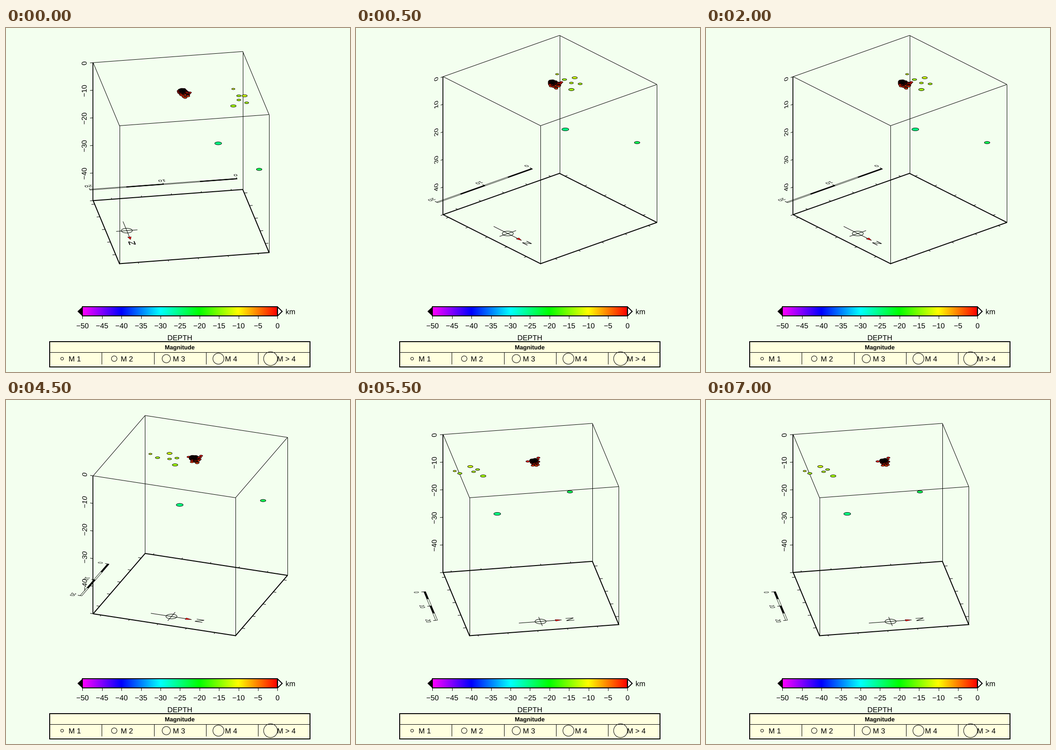
Recreate the animation shown at these times as a matplotlib script. Size 748 by 748 pixels, loop 8 s.

```python
import colorsys
import math

import numpy as np
import matplotlib.pyplot as plt
from matplotlib.animation import FuncAnimation
from matplotlib.patches import Ellipse, PathPatch
from matplotlib.path import Path
from matplotlib.textpath import TextPath
from matplotlib.transforms import Affine2D

SIZE = 748
DPI = 100
PT = 72 / DPI                      # points per pixel
BACK = "#f3ffef"
SQUASH = math.sin(math.radians(25))  # vertical squeeze of the ground plane
NORTH, WEST = 329.5, 330.3         # ground edge lengths
KM = 6                             # pixels per km of depth
EDGE = 330

fig = plt.figure(figsize=(SIZE / DPI, SIZE / DPI), dpi=DPI, facecolor=BACK)
ax = fig.add_axes([0, 0, 1, 1])
ax.set_xlim(-0.5, SIZE - 0.5)
ax.set_ylim(SIZE - 0.5, -0.5)
ax.axis("off")


def add(patch, group=None):
    patch.set_zorder(2)
    ax.add_patch(patch)
    if group is not None:
        group.append(patch)


def line(points, group=None, lw=1.0, fill="none", closed=False, edge="black"):
    points = [tuple(p) for p in points]
    if closed:
        points.append(points[0])
    add(PathPatch(Path(points, closed=closed), fc=fill, ec=edge, lw=lw * PT,
                  capstyle="butt", joinstyle="miter"), group)


def disc(center, r, group=None, squash=SQUASH, fill="none", lw=1.0):
    add(Ellipse(center, 2 * r, 2 * r * squash, fc=fill, ec="black", lw=lw * PT), group)


def put(text, pos, size=16, group=None, right=(1, 0), up=(0, -1), anchor=0.5,
        weight="normal"):
    """Text placed by its box, drawn in the plane spanned by right and up."""
    path = TextPath((0, 0), text, size=size,
                    prop={"family": "Liberation Sans", "weight": weight})
    box = path.get_extents()
    shift = Affine2D().translate(-box.x0 - anchor * box.width, -(box.y0 + box.y1) / 2)
    plane = Affine2D(np.array([[right[0], up[0], pos[0]],
                               [right[1], up[1], pos[1]],
                               [0, 0, 1]]))
    add(PathPatch((shift + plane).transform_path(path), fc="black", lw=0), group)


def depth_color(depth):
    return colorsys.hsv_to_rgb(-depth * 6 / 360, 1, 1)


def signed(value):
    return f"\u2212{-value}" if value < 0 else "0"


def make_events():
    """Rows of north, west, depth, radius."""
    rng = np.random.default_rng(11)
    events = [
        (.3235, .779, -25, 7.5), (.8426, .9615, -23.3, 6),
        (.0644, .9257, -11.8, 3.5), (.1036, .9557, -13.5, 4.8),
        (.1785, .981, -11.9, 5.7), (.1935, .940, -12.9, 4.3),
        (.2284, .986, -13.3, 4.5), (.2494, .8933, -13.6, 6),
        (.482, .52, -.7, 4), (.558, .548, -.3, 3.6), (.552, .543, -.8, 3.6),
        (.54, .52, -2.5, 3.6), (.535, .525, -2.3, 3.6),
    ]
    for _ in range(120):
        a, r = rng.uniform(0, 2 * math.pi), math.sqrt(rng.uniform())
        events.append((.522 + .018 * r * math.cos(a), .504 + .023 * r * math.sin(a),
                       -rng.uniform(0, 1.0), rng.uniform(3.2, 4.6)))
    for _ in range(36):
        events.append((.532 + rng.uniform(-.02, .02), .517 + rng.uniform(-.022, .022),
                       -rng.uniform(.5, 2.0), rng.uniform(3.2, 4.2)))
    return events


def draw_legend():
    ramp = [[depth_color(-50 + 50 * i / 423) for i in range(424)]]
    ax.imshow(ramp, extent=(166, 590, 625.5, 606), aspect="auto",
              interpolation="nearest", zorder=1)
    ax.set_xlim(-0.5, SIZE - 0.5)
    ax.set_ylim(SIZE - 0.5, -0.5)
    line([(166, 606), (155.5, 615.8), (166, 625.5)], fill="black", closed=True)
    line([(590, 606), (600, 615.8), (590, 625.5)], fill="white", closed=True, lw=2)
    line([(166, 606), (590, 606), (590, 625.5), (166, 625.5)], closed=True, lw=2)
    for depth in range(-50, 1, 5):
        x = 590 + depth * 8.48
        line([(x, 625), (x, 632)])
        put(signed(depth), (x, 647))
    put("km", (618, 616))
    put("DEPTH", (377.5, 673))

    line([(94.5, 682), (661, 682), (661, 736.5), (94.5, 736.5)], closed=True,
         fill="#ffffdf", lw=2)
    line([(94.5, 705), (661, 705)])
    put("Magnitude", (377.5, 695), 13, weight="bold")
    for i, name in enumerate(("M 1", "M 2", "M 3", "M 4", "M > 4")):
        x = 94.5 + 113.3 * i
        if i:
            line([(x, 705), (x, 731)])
        disc((x + 27, 718.5), 3 * (i + 1), squash=1)
        put(name, (x + 42.5, 719), anchor=0)


def draw_view(azimuth, bar_half, along_west, show_sign, events):
    group = []
    a = math.radians(azimuth)
    north = NORTH * np.array([math.sin(a), math.cos(a) * SQUASH])
    west = WEST * np.array([math.cos(a), -math.sin(a) * SQUASH])
    corners = [(0, 0), (1, 0), (1, 1), (0, 1)]
    flat = np.array([u * north + v * west for u, v in corners])
    origin = np.array([189 - flat[:, 0].min(), 512 - flat[:, 1].max()])

    def at(u, v, depth=-50):
        return origin + u * north + v * west - (0, (50 + depth) * KM)

    # Scale bar south of the box
    to_east, to_north = -west / EDGE, north / EDGE
    stops = np.linspace(0.5 + bar_half, 0.5 - bar_half, 5)
    for i in range(4):
        lo, hi = stops[i], stops[i + 1]
        line([at(-.178, lo), at(-.178, hi), at(-.166, hi), at(-.166, lo)], group,
             fill="none" if i % 2 else "black", closed=True, lw=0.8)
    for i in (0, 2, 4):
        line([at(-.178, stops[i]), at(-.194, stops[i])], group)
        put(str(5 * i), at(-.228, stops[i]), 15, group, to_east, to_north)

    # Compass
    cu, cv = .5, .137
    disc(at(cu, cv), 12, group)
    line([at(cu - .145, cv), at(cu + .11, cv)], group)
    line([at(cu, cv - .071), at(cu, cv + .071)], group)
    line([at(cu + .1, cv - .012), at(cu + .142, cv), at(cu + .1, cv + .012)], group,
         fill="red", closed=True, lw=0.6)
    put("N", at(cu + .197, cv), 25, group, to_east, to_north)

    # Box and floor ticks
    line([at(u, v) for u, v in corners], group, lw=2, closed=True)
    line([at(u, v, 0) for u, v in corners], group, closed=True)
    for u, v in corners:
        is_left = at(u, v)[0] < 189.1
        line([at(u, v), at(u, v, 0)], group, lw=1.8 if is_left else 1)
    for i in range(5):
        u, v = .056 + .2 * i, .125 + .2 * i
        for side, out in ((0, -.021), (1, 1.021)):
            line([at(u, side), at(u, out)], group)
            line([at(side, v), at(out, v)], group)

    # Depth axis on the leftmost edge
    base = np.array([189, origin[1] + flat[flat[:, 0].argmin(), 1]])
    out = -(west if along_west else north)
    for depth in range(0, -51, -10):
        p = base - (0, (50 + depth) * KM)
        line([p, p + .021 * out], group)
        if depth == -50:
            continue
        label, pos = signed(depth), p + .06 * out
        if depth and not show_sign:
            label, pos = label[1:], pos - (0, 4.5)
        put(label, pos, 15.5, group, (0, -1), out / EDGE)

    # Events, far ones first
    spots = [(at(u, v, d), r, d) for u, v, d, r in events]
    for spot, r, depth in sorted(spots, key=lambda s: s[0][1]):
        disc(spot, r, group, fill=depth_color(depth), lw=0.9)
    return group


draw_legend()
quakes = make_events()
views = [
    draw_view(10, .492, True, True, quakes),
    draw_view(40, .408, True, False, quakes),
    draw_view(70, .263, False, True, quakes),
    draw_view(100, .226, False, True, quakes),
]


def update(frame):
    current = (frame + 4) // 5     # half a second, then 2.5 s for each view
    for i, group in enumerate(views):
        for artist in group:
            artist.set_visible(i == current)
    return []


anim = FuncAnimation(fig, update, frames=16, interval=500, repeat=True, repeat_delay=0,
                     blit=False)
plt.show()
```
